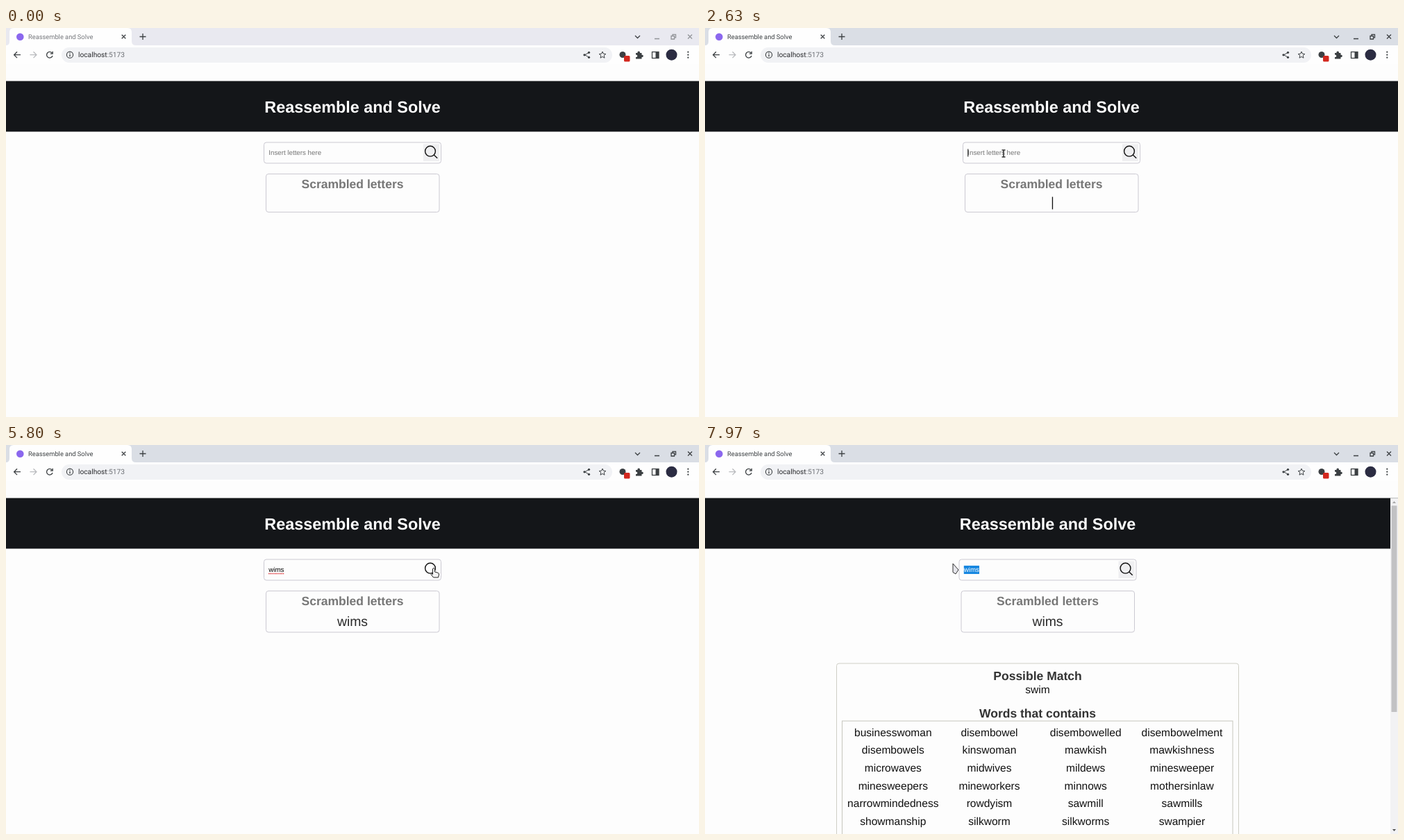
Recreate the animation shown at these times as an HTML page. Size 998 px wide and 561 px high, loop 8 s.

```html
<!DOCTYPE html>
<html lang="en">
<head>
<meta charset="utf-8">
<title>Reassemble and Solve</title>
<style>
  html, body { margin: 0; width: 100%; height: 100%; overflow: hidden; background: #fdfdfd; }
  svg { display: block; width: 100vw; height: 100vh; }
  text { font-family: "Liberation Sans", Arial, sans-serif; white-space: pre; text-rendering: geometricPrecision; }
  .ui { font-family: Roboto, sans-serif; }
  .mid { text-anchor: middle; }
  .h2 { font-size: 17.5px; font-weight: bold; }
  .word { font-size: 15.56px; fill: #111; }
  .field { font-size: 9.74px; }
  .line { fill: none; stroke: #3c4043; stroke-width: 1.3; }
  .box { fill: none; stroke: #cbc9d2; }
</style>
</head>
<body>
<svg viewBox="0 0 998 561">
  <!-- tab strip -->
  <rect id="strip" width="998" height="25"/>
  <path d="M0 25Q5 25 5 19V6Q5 0 11 0H175Q181 0 181 6V19Q181 25 187 25Z" fill="#fefefe"/>
  <circle cx="20.3" cy="12.7" r="5.3" fill="#8b67ee"/>
  <text id="tabTitle" class="ui" x="32" y="16" font-size="9.3">Reassemble and Solve</text>
  <path class="line" d="M166.7 9.7l5.6 5.6m0-5.6l-5.6 5.6M192.5 12.5h9M197 8v9"/>
  <path class="line" d="M906 11l3.5 3.5 3.5-3.5"/>
  <path id="windowButtons" class="line" d="M934 15.5h7M958 11.5h4.5V16H958zM960 11.3v-2h4.5v4.5h-2M982 9.5l6 6m0-6l-6 6"/>

  <!-- toolbar -->
  <rect y="25" width="998" height="27" fill="#fefefe"/>
  <rect x="80" y="28" width="793" height="22" rx="11" fill="#f1f2f5"/>
  <path class="line" d="M21 38.7h-9M16 34.3l-4.4 4.4 4.4 4.4"/>
  <path class="line" d="M34.5 38.7h9M39.5 34.3l4.4 4.4-4.4 4.4" style="stroke:#b9bbbe"/>
  <path class="line" d="M66.2 36A4.3 4.3 0 1 0 67 40M67.2 33.8v3.4h-3.4"/>
  <circle class="line" cx="92" cy="38.7" r="4.6" style="stroke-width:1.1"/>
  <path class="line" d="M92 38v3.2M92 35.8v1.2"/>
  <text class="ui" x="104" y="42.3" font-size="10.2" fill="#28292c">localhost<tspan fill="#6b6e73">:5173</tspan></text>
  <path class="line" d="M839.5 35.5l-6 3.3 6 3.3" style="stroke-width:1"/>
  <g fill="#3c4043">
    <circle cx="839.5" cy="35.3" r="1.6"/><circle cx="833" cy="38.8" r="1.6"/><circle cx="839.5" cy="42.3" r="1.6"/>
    <circle cx="982.3" cy="34.7" r="1.1"/><circle cx="982.3" cy="38.7" r="1.1"/><circle cx="982.3" cy="42.7" r="1.1"/>
    <circle cx="888" cy="38.5" r="4.5"/>
    <path d="M907 36h2.5a1.8 1.8 0 1 1 3.4 0H915.5v2.8a1.7 1.7 0 1 1 0 3.2v2.5h-8.5v-2.6a1.7 1.7 0 1 0 0-3.2z"/>
    <path d="M935.5 34.5h4.5v9h-4.5z"/>
  </g>
  <path class="line" d="M859 34l1.4 3.2 3.4.3-2.6 2.3.8 3.4-3-1.8-3 1.8.8-3.4-2.6-2.3 3.4-.3z" style="stroke-width:1"/>
  <rect x="890" y="40" width="8.5" height="8.5" rx="1.5" fill="#d3281f"/>
  <rect class="line" x="930.5" y="34.5" width="9.5" height="9"/>
  <circle cx="958.5" cy="38.7" r="8" fill="#2b2c42"/>

  <!-- page -->
  <rect y="52" width="998" height="509" fill="#fdfdfd"/>
  <rect y="76.5" width="998" height="73" fill="#141619"/>
  <g id="page">
    <text class="mid" x="499" y="121.7" font-size="23.38" font-weight="bold" fill="#fff">Reassemble and Solve</text>
    <rect class="box" x="371.5" y="165" width="255" height="30" rx="3.5"/>
    <rect id="selection" y="174" height="12" fill="#1787e0"/>
    <text id="placeholder" class="field" x="378.3" y="183.3" fill="#757575">Insert letters here</text>
    <text class="field" x="378.3" y="183.3"><tspan id="typed"></tspan><tspan id="picked" fill="#fff"></tspan></text>
    <path id="squiggle" d="M378 185.5h23" stroke="#e0393e" stroke-width="1.3" stroke-dasharray="1.5 .8"/>
    <rect id="caret" y="174.5" width="1" height="11"/>
    <rect id="button" x="601" y="167.5" width="23" height="24.5" fill="#efeff1"/>
    <g fill="none" stroke="#111" stroke-width="1.4">
      <circle cx="611" cy="177.7" r="7.4"/>
      <path d="M616.2 183l5 4.8"/>
    </g>
    <rect id="lettersBox" class="box" x="374.5" y="210.5" width="249.5" rx="3.5"/>
    <text class="mid h2" x="499" y="231.3" fill="#777">Scrambled letters</text>
    <text id="letters" class="mid" x="499" y="261.3" font-size="19.4" fill="#2b2b2b"></text>
    <rect id="blinker" x="499.8" y="243.5" width="1.3" height="18"/>
  </g>

  <g id="results">
    <rect class="box" x="189.5" y="315" width="579" height="300" rx="3.5" style="stroke:#cfcfc6"/>
    <text class="mid h2" x="479" y="338.9" fill="#333">Possible Match</text>
    <text class="mid word" x="479" y="357.6">swim</text>
    <text class="mid h2" x="479" y="392.7" fill="#333">Words that contains</text>
    <rect class="box" x="197.5" y="398" width="562.5" height="300" style="stroke:#c6c6bd"/>
    <g id="words"></g>
    <rect x="987" y="76.5" width="11" height="485" fill="#f2f2f4"/>
    <rect x="988.5" y="87.5" width="8" height="297.5" fill="#c2c2c4"/>
    <path d="M990 84l2.5-3 2.5 3z" fill="#a5a5a5"/>
    <path d="M990 554l2.5 3 2.5-3z" fill="#505050"/>
  </g>

  <!-- pointers, hotspot at 0,0 -->
  <g id="pointer">
    <path id="beam" d="M-2.5-5H-.7L0-4.3.7-5H2.5M0-4.3V4.3M-2.5 5H-.7L0 4.3.7 5H2.5" fill="none" stroke="#333" stroke-width="1.5"/>
    <path id="hand" d="M-1.5 .5Q0-1.5 1.5 .5V5L6 6.3Q7.8 7 7.5 9L6.5 13H-.5L-4 8.5Q-3.5 6.5-1.5 8.5Z" fill="#f4f4f4" stroke="#222"/>
    <path id="arrow" d="M0 0L8 9 4 15 0 12.5Z" fill="#e4e4ea" stroke="#333"/>
  </g>
</svg>
<script>
const LOOP = 8000, FOCUS = 1300, ACTIVE = 1520, BLUR = 5700, RESULTS = 6050;
const KEYS = [3100, 3380, 3620, 3850];
const WORD = "wims";
const PATH = [
  [300, 590, 466], [900, 430, 181], [4350, 430, 181], [5200, 648, 190], [5600, 616, 178],
  [6850, 616, 178], [7400, 402, 180], [7500, 402, 180], [7900, 357, 171]
];
const TABLE = `businesswoman disembowel disembowelled disembowelment
disembowels kinswoman mawkish mawkishness
microwaves midwives mildews minesweeper
minesweepers mineworkers minnows mothersinlaw
narrowmindedness rowdyism sawmill sawmills
showmanship silkworm silkworms swampier`;

const el = id => document.getElementById(id);
const set = (id, attrs) => { for (const k in attrs) el(id).setAttribute(k, attrs[k]); };
const show = (id, on) => set(id, { visibility: on ? "visible" : "hidden" });
const smooth = u => u * u * (3 - 2 * u);

el("words").innerHTML = TABLE.split("\n").map((row, r) => row.split(" ").map((word, c) =>
  `<text class="mid word" x="${270.8 + c * 138.7}" y="${419.8 + r * 25.58}">${word}</text>`).join("")).join("");

function pointerAt(t) {
  const next = PATH.findIndex(p => p[0] > t);
  if (next < 0) return PATH[PATH.length - 1].slice(1);
  if (next === 0) return PATH[0].slice(1);
  const [t0, x0, y0] = PATH[next - 1], [t1, x1, y1] = PATH[next];
  const u = smooth((t - t0) / (t1 - t0));
  return [x0 + (x1 - x0) * u, y0 + (y1 - y0) * u];
}

function draw(t) {
  const active = t >= ACTIVE, found = t >= RESULTS, shift = found ? -5.5 : 0;
  set("strip", { fill: active ? "#dadee5" : "#e9e9f0" });
  set("tabTitle", { fill: active ? "#3c4043" : "#75777c" });
  set("windowButtons", { opacity: active ? 1 : .5 });
  set("page", { transform: `translate(${shift})` });
  show("results", found);

  const [x, y] = pointerAt(t), px = x - shift;
  const overButton = px > 601 && px < 624 && y > 167 && y < 192;
  const overInput = px > 371 && px < 627 && y > 165 && y < 195;
  set("pointer", { transform: `translate(${x} ${y})` });
  const kind = t < PATH[0][0] ? "" : overButton ? "hand" : overInput ? "beam" : "arrow";
  for (const id of ["hand", "beam", "arrow"]) show(id, id === kind);
  show("button", !overButton);

  const count = KEYS.filter(k => t >= k).length;
  const text = WORD.slice(0, count);
  show("placeholder", !count);
  el("letters").textContent = text;
  set("lettersBox", { height: count ? 59.5 : 55 });
  show("squiggle", t >= BLUR && !found);

  // dragging leftwards selects the letters the pointer has passed
  const split = t < 7500 ? count : Math.max(0, Math.min(4, Math.round((px - 378.3) / 5.6)));
  el("typed").textContent = text.slice(0, split);
  el("picked").textContent = text.slice(split);
  const start = el("typed").getComputedTextLength(), width = el("picked").getComputedTextLength();
  set("selection", { x: 378.3 + start, width });

  const lastInput = count ? KEYS[count - 1] : FOCUS;
  show("caret", t >= FOCUS && t < BLUR && (t - lastInput) % 1000 < 500);
  set("caret", { x: 378.3 + start });
  const wave = .5 - .65 * Math.cos(2 * Math.PI * t / 1000);
  set("blinker", { opacity: count ? 0 : Math.max(0, Math.min(1, wave)) });
}

function tick() {
  draw(performance.now() % LOOP);
  requestAnimationFrame(tick);
}
tick();
</script>
</body>
</html>
```
